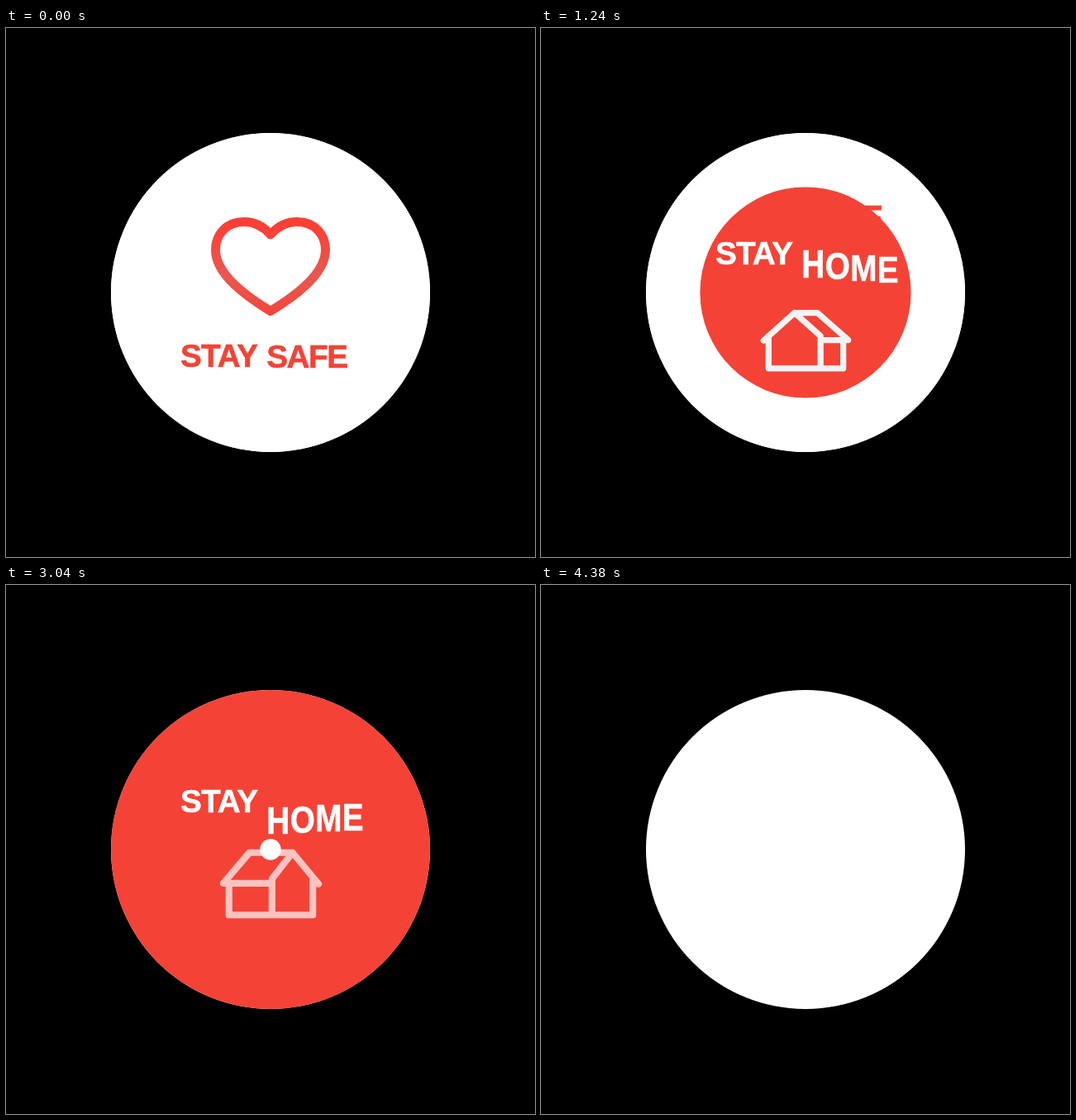
These frames come from a looping animation (640x640 px, 4.4 s). An HTML page with a canvas:

```html
<!DOCTYPE html>
<html lang="en">
<head>
<meta charset="utf-8">
<title>Stay safe, stay home</title>
<style>
  html, body { margin: 0; width: 100%; height: 100%; overflow: hidden; background: #000; }
  canvas { display: block; width: 640px; height: 640px; }
</style>
</head>
<body>
<canvas id="stage" width="640" height="640"></canvas>
<script>
const ctx = document.getElementById('stage').getContext('2d');
const RED = '#f44336', WHITE = '#fff';
const LOOP = 4400, HALF = LOOP / 2, RADIUS = 193;
const LOW = 410.4, HIGH = 249, TRAVEL = LOW - HIGH;

const mix = (a, b, k) => a + (b - a) * k;
const clamp = (v, lo, hi) => Math.min(hi, Math.max(lo, v));
const mixRgb = (a, b, k) => `rgb(${a.map((v, i) => Math.round(mix(v, b[i], k)))})`;

// Cubic bezier (.8, 0, .17, 1)
function ease(u) {
  if (u <= 0) return 0;
  if (u >= 1) return 1;
  let lo = 0, hi = 1;
  for (let i = 0; i < 24; i++) {
    const s = (lo + hi) / 2, r = 1 - s;
    if (2.4 * r * r * s + 0.51 * r * s * s + s * s * s < u) lo = s;
    else hi = s;
  }
  return lo * lo * (3 - 2 * lo);
}

function disc(r, color) {
  ctx.beginPath();
  ctx.arc(320, 320, r, 0, Math.PI * 2);
  ctx.fillStyle = color;
  ctx.fill();
}

// pose(k) gives baseline and vertical stretch, k runs 0..1 along the word
function word(text, x, spacing, color, pose) {
  ctx.fillStyle = ctx.strokeStyle = color;
  ctx.lineWidth = 0.6;
  for (let i = 0; i < text.length; i++) {
    const { y, stretch } = pose(i / (text.length - 1));
    const dx = ctx.measureText(text.slice(0, i + 1)).width - ctx.measureText(text[i]).width;
    ctx.save();
    ctx.translate(x + dx + i * spacing, y);
    ctx.scale(1, stretch);
    ctx.fillText(text[i], 0, 0);
    ctx.strokeText(text[i], 0, 0);
    ctx.restore();
  }
}

// The old word runs ahead of "STAY", the new one trails behind it
function slogan(s, p, leaving) {
  const away = leaving ? p : 1 - p;
  const [first, last] = leaving ? s.lead : s.lag;
  word('STAY', 211.1, -0.9, s.color, () => ({ y: s.rest + s.dir * TRAVEL * away, stretch: 1 }));
  word(s.text, 315.3, s.spacing, s.color, k => ({
    y: s.rest + s.drop + s.dir * Math.min(165, mix(first, last, k) * away),
    stretch: 1 + (leaving
      ? Math.min(0.2, 1.75 * away) * mix(1, 0.9, k)
      : Math.min(0.25, mix(1, 0.6, k) * away))
  }));
}

function stroke(cx, cy, s, width, path) {
  ctx.save();
  ctx.translate(cx, cy);
  ctx.scale(s, s);
  ctx.lineWidth = width;
  ctx.lineCap = ctx.lineJoin = 'round';
  ctx.beginPath();
  path();
  ctx.stroke();
  ctx.restore();
}

function heart(p, leaving) {
  const s = leaving ? 1 - 1.95 * p : 1 - 2.92 * (1 - p);
  if (s <= 0) return;
  const cy = 288.5 - TRAVEL * (leaving ? 0.5 * p : 0.24 * (1 - p));
  const g = ctx.createLinearGradient(0, -50, 0, 56);
  g.addColorStop(0, mixRgb([252, 63, 53], [204, 95, 100], 1 - s));
  g.addColorStop(0.58, mixRgb([232, 88, 80], [204, 92, 100], 1 - s));
  g.addColorStop(1, mixRgb([243, 70, 60], [204, 92, 100], 1 - s));
  ctx.strokeStyle = g;
  stroke(320, cy, s, 11, () => {
    ctx.moveTo(0, -38.5);
    ctx.bezierCurveTo(-10, -50, -20, -54, -32, -54);
    ctx.bezierCurveTo(-54, -54, -66.5, -38, -66.5, -20);
    ctx.bezierCurveTo(-66.5, 10, -28, 37, 0, 54);
    ctx.bezierCurveTo(28, 37, 66.5, 10, 66.5, -20);
    ctx.bezierCurveTo(66.5, -38, 54, -54, 32, -54);
    ctx.bezierCurveTo(20, -54, 10, -50, 0, -38.5);
    ctx.closePath();
  });
}

// turn: width of the visible side wall, negative when it lies on the right
function house(p, leaving) {
  const left = 1 - p;
  const s = leaving ? 1 - 1.95 * p : 1 - 1.74 * left;
  if (s <= 0) return;
  const cy = 347.5 + TRAVEL * (leaving ? 0.53 * p : 0.84 * left);
  const turn = clamp(leaving ? 57 + 119 * p : 57 - 452 * left, -130, 130);
  const side = Math.abs(turn), flip = turn < 0 ? -1 : 1;
  const wall = 74.5, tip = 84.5, top = -55.5, base = 55.5;
  const corner = side - wall, peak = (corner + wall) / 2;
  const shade = Math.round(255 - 30 * (1 - s));
  ctx.strokeStyle = leaving ? WHITE : `rgb(${shade},${shade},${shade})`;
  ctx.globalAlpha = leaving ? s : 1;
  stroke(320.5, cy, s, 12, () => {
    const line = (...pts) => pts.forEach(([x, y], i) => ctx[i ? 'lineTo' : 'moveTo'](x * flip, y));
    line([-wall, 0], [-wall, base], [wall, base], [wall, -6]);
    line([corner, base], [corner, -9], [peak, top]);
    line([corner, -1], [-tip, -1], [peak - side, top], [peak, top], [tip, 0]);
  });
  ctx.globalAlpha = 1;
}

const safe = {
  text: 'SAFE', spacing: -1.5, color: RED, back: WHITE, icon: heart,
  rest: LOW, dir: -1, drop: 0.3, lead: [200, 212], lag: [183, 209], start: 2703
};
const home = {
  text: 'HOME', spacing: 0.4, color: WHITE, back: RED, icon: house,
  rest: HIGH, dir: 1, drop: 1, lead: [310, 289], lag: [228, 257], start: 613
};

function scene(s, p, leaving) {
  s.icon(p, leaving);
  slogan(s, p, leaving);
}

function draw(t) {
  ctx.fillStyle = '#000';
  ctx.fillRect(0, 0, 640, 640);
  disc(RADIUS, WHITE);
  if (t >= LOOP - 20) return;

  const [old, next] = t < HALF ? [safe, home] : [home, safe];
  const p = ease((t % HALF) / HALF);
  const r = RADIUS * ease((t - next.start) / 1200);
  ctx.font = 'bold 38.7px "Liberation Sans", Arial, sans-serif';

  disc(RADIUS, old.back);
  if (r < RADIUS) scene(old, p, true);
  if (r > 0) {
    ctx.save();
    disc(r, next.back);
    ctx.clip();
    scene(next, p, false);
    ctx.restore();
  }
}

function tick() {
  draw(performance.now() % LOOP);
  requestAnimationFrame(tick);
}
tick();
</script>
</body>
</html>
```
